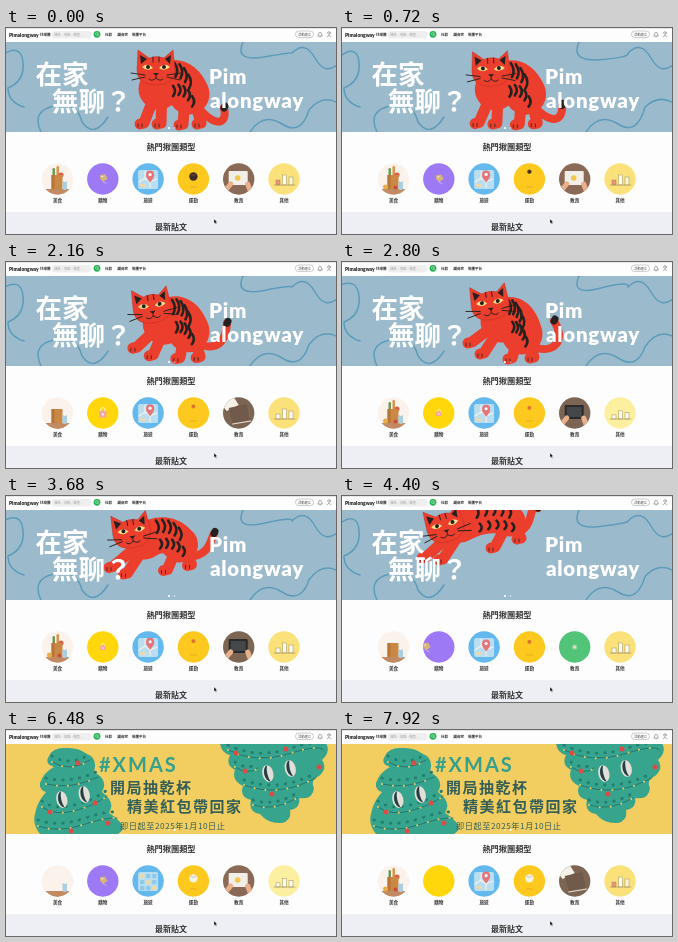
An HTML page that plays this animation: 330 by 206 pixels, repeating every 8 s.

```html
<!DOCTYPE html>
<html lang="zh-Hant">
<head>
<meta charset="utf-8">
<style>
html, body { margin: 0; width: 100%; height: 100%; overflow: hidden; background: #fdfdfd; }
svg { display: block; width: 100%; height: 100%; }
text { font-family: "Noto Sans CJK TC", "Noto Sans CJK", "Noto Sans CJK JP", sans-serif; }
.b { font-weight: 700; }
.l { fill: none; stroke-linecap: round; stroke-linejoin: round; }
.latin { font-family: Lato, sans-serif; font-weight: 900; }
.wire { stroke: #1f6a68; stroke-width: .8; }
.bulbs { stroke: #f2cf62; stroke-width: 2; stroke-dasharray: 0 11; }
.needles { stroke: #23806f; stroke-width: 3; stroke-dasharray: .4 8; stroke-linecap: butt; }
</style>
</head>
<body>
<svg viewBox="0 0 330 206" preserveAspectRatio="none">
  <defs>
    <clipPath id="hero"><rect y="14" width="330" height="90"/></clipPath>
    <clipPath id="disc"><circle r="15.7"/></clipPath>
    <g id="eye">
      <ellipse rx="5.5" ry="8.5" fill="#e2dfd6"/>
      <path d="M1-8.400A5.500 8.500 0 0 0 1 8.400Q-2 0 1-8.400" fill="#263f47"/>
    </g>
    <g id="face"><use href="#eye" x="-11.500"/><use href="#eye" x="11.500"/></g>
    <path id="wireL" class="l" d="M46 32Q64 43 84 30M40 54Q66 60 92 47M36 77Q48 86 68 81T101 66M32 96Q52 103 76 95T111 88"/>
    <path id="wireR" class="l" d="M222 20Q250 34 282 24T317 20M229 37Q242 46 252 38M238 55Q272 68 310 48M247 75Q268 82 291 68"/>
  </defs>

  <rect width="330" height="206" fill="#fdfdfd"/>
  <g clip-path="url(#hero)">
    <g id="catSlide">
      <rect y="14" width="330" height="90" fill="#9bbbcc"/>
      <path id="waves" class="l" stroke="#5c9cba" stroke-width="1.5"/>
      <g id="cat"></g>
      <g fill="#fff">
        <text class="b" x="29.5" y="56" font-size="26.5">在家</text>
        <text class="b" x="46" y="83" font-size="26.5">無聊？</text>
        <g font-size="20.5" letter-spacing=".7">
          <text class="latin" x="203" y="56">Pim</text>
          <text class="latin" x="204" y="80">alongway</text>
        </g>
      </g>
    </g>
    <g id="treeSlide">
      <rect y="14" width="330" height="90" fill="#f2cd60"/>
      <g fill="#37a48d">
        <path d="M60 18Q47 17 43 26Q38 34 48 37Q38 42 34 53Q33 60 40 62Q31 72 29 84Q26 95 35 105H110Q121 100 114 92Q110 87 103 83Q110 72 96 62Q103 50 88 42Q92 28 81 24Q72 17 60 18Z"/>
        <path d="M214 13Q215 23 224 25Q219 35 229 40Q225 50 237 56Q233 67 245 70Q242 82 254 84Q262 94 276 93Q286 90 284 80Q295 78 293 68Q307 70 308 58Q304 50 313 46Q322 38 316 30Q325 22 320 13Z"/>
      </g>
      <use href="#wireL" class="needles" y="-6"/><use href="#wireR" class="needles" y="-5"/>
      <use href="#wireL" class="wire"/><use href="#wireR" class="wire"/>
      <use href="#wireL" class="bulbs"/><use href="#wireR" class="bulbs"/>
      <path class="l" d="M65 101h0M89 73h0M44 82h0M72 33h0M102 93h0M239 41h0M266 64h0M313 37h0M280 19h0M230 23h0" stroke="#d94c48" stroke-width="5"/>
      <use href="#face" transform="translate(67 67) rotate(-13)"/>
      <use href="#face" transform="translate(273 41) rotate(-13)"/>
      <text class="latin" x="93" y="41.500" font-size="20" letter-spacing="2" fill="#35a08c" style="font-weight:700">#XMAS</text>
      <g fill="#345f57" class="b">
        <text x="104" y="62.500" font-size="15" letter-spacing="1.500">開局抽乾杯</text>
        <text x="121" y="82" font-size="15" letter-spacing="1.500">精美紅包帶回家</text>
        <text x="114" y="98.700" font-size="8.200" letter-spacing=".55" style="font-weight:500">即日起至2025年1月10日止</text>
      </g>
    </g>
    <circle id="dotA" cx="163" cy="100" r="1.1" fill="#fff"/>
    <circle id="dotB" cx="168.500" cy="100" r="1.1" fill="#fff"/>
  </g>

  <path d="M0 .3H330" stroke="#c9c9c9" stroke-width=".6"/>
  <text class="latin" x="3" y="8.800" font-size="4.900" fill="#222">Pimalongway</text>
  <g font-size="3.500" fill="#333" class="b">
    <text x="34" y="7.700">找揪團</text><text x="99" y="7.700">社群</text>
    <text x="111.500" y="7.700">購商家</text><text x="126" y="7.700">揪團平台</text>
  </g>
  <rect x="46" y="3" width="39" height="7.500" rx="2" fill="#efefef"/>
  <text x="48.500" y="7.700" font-size="3.200" fill="#999">團名、地點、類型...</text>
  <circle cx="91" cy="6.300" r="3.400" fill="#25b254"/>
  <path class="l" d="M92 7.300l1 1M92.300 6a1.400 1.400 0 1 1-2.800 0a1.400 1.400 0 1 1 2.800 0" stroke="#fff" stroke-width=".4"/>
  <rect x="289.500" y="3" width="18" height="6.600" rx="3.300" fill="#fff" stroke="#999" stroke-width=".5"/>
  <text x="298.500" y="7.600" font-size="3.300" text-anchor="middle" fill="#444">活動建立</text>
  <g class="l" stroke="#777" stroke-width=".6">
    <path d="M312 7.800Q312.700 7 312.700 5.800A1.400 1.400 0 0 1 315.500 5.800Q315.500 7 316.200 7.800ZM313.700 8.900h.8"/>
    <circle cx="323" cy="5" r="1.300"/><path d="M321 8.800Q323 5.800 325 8.800"/>
  </g>

  <text class="b" x="165" y="121.700" font-size="8.200" text-anchor="middle" fill="#333">熱門揪團類型</text>
  <g id="icons"></g>
  <rect y="184" width="330" height="22" fill="#eeeff4"/>
  <text class="b" x="165" y="201.700" font-size="8" text-anchor="middle" fill="#333">最新貼文</text>
  <path d="M208 191v4.600l1.100-1 .8 1.700.8-.4-.8-1.600h1.400z" fill="#111" stroke="#fff" stroke-width=".3"/>
</svg>
<script>
const $ = id => document.getElementById(id);
const clamp = v => Math.max(0, Math.min(1, v));
const ease = v => (v = clamp(v)) * v * (3 - 2 * v);
const mix = (a, b, k) => a.map((v, i) => v + (b[i] - v) * k);

// head x, y, tilt | spine curve | body width | four feet | tail curve
const poses = [
  [150, 40, 0, 153, 61, 172, 42, 183, 66, 41, 138, 95, 155, 95, 177, 96, 195, 95, 208, 99, 222, 98, 218, 80],
  [143, 48, -12, 156, 64, 174, 44, 186, 66, 43, 132, 92, 154, 95, 179, 95, 197, 94, 220, 90, 215, 66, 226, 61],
  [148, 41, -7, 159, 60, 173, 47, 180, 72, 41, 130, 80, 142, 91, 170, 96, 192, 95, 214, 94, 224, 77, 214, 60],
  [103, 29, -14, 119, 31, 146, 16, 168, 25, 31, 84, 61, 101, 63, 153, 51, 179, 42, 194, 28, 185, 9, 198, 13]
];
// time, pose
const marks = [[0, 0], [520, 0], [1320, 1], [1680, 1], [2560, 2], [3040, 2], [4320, 3], [5100, 3]];

function poseAt(t) {
  const i = marks.findIndex(m => m[0] > t);
  const [a, p] = marks[i - 1], [b, q] = marks[i];
  return mix(poses[p], poses[q], ease((t - a) / (b - a)));
}

const limb = (d, w, c = '#eb3e2c') => `<path class="l" d="${d}" stroke="${c}" stroke-width="${w}"/>`;

function drawCat(t) {
  const p = poseAt(t), sway = Math.sin(t / 260);
  const [hx, hy, tilt, x0, y0, cx, cy, x1, y1, w] = p;
  const tail = p.slice(18);
  tail[4] += 2 * sway; tail[5] += sway;
  let s = limb(`M${x1 + 8} ${y1 + 12}C${tail}`, 8) + limb(`M${tail[4]} ${tail[5]}l1-2`, 7, '#26211f');
  for (let i = 0; i < 4; i++) {
    const fx = p[10 + 2 * i], fy = p[11 + 2 * i], [bx, by] = i < 2 ? [x0 - 2 + 5 * i, y0] : [x1 - 22 + 9 * i, y1 + 5];
    s += limb(`M${bx} ${by}L${fx} ${fy}l-4 1`, 11);
    s += limb(`M${fx - 6} ${fy + 1}v3M${fx - 2} ${fy + 1}v3`, .8, '#26211f');
  }
  s += limb(`M${x0} ${y0}Q${cx} ${cy} ${x1} ${y1}`, w);
  for (let i = 0; i < 5; i++) {
    const k = .28 + i * .17, j = 1 - k;
    const x = j * j * x0 + 2 * j * k * cx + k * k * x1, y = j * j * y0 + 2 * j * k * cy + k * k * y1;
    s += limb(`M${x} ${y - w * .43}q5 ${w * .17} 1 ${w * .34}M${x + 4} ${y + w * .1}q4 ${w * .13} 0 ${w * .25}`, 2.6, '#26211f');
  }
  return s + `<g transform="translate(${hx} ${hy}) rotate(${tilt + sway})">
    <path d="M-18-18L-7-10Q1-13 8-10L17-18L19 2Q18 17 0 17Q-19 17-19 2Z" fill="#eb3e2c" stroke="#c32d25" stroke-width=".5"/>
    <path d="M-16-13l1 9 6-5zM15-13l-1 9-5-5z" fill="#26211f"/>
    <path d="M-14-1Q-8-6-3 0Q-9 4-14-1M3 0Q8-6 14-1Q8 4 3 0" fill="#f8dd8c"/>
    <circle cx="-8" cy="-1" r="2" fill="#222"/><circle cx="8" cy="-1" r="2" fill="#222"/>
    <path d="M-3 5h6l-3 3z" fill="#26211f"/>
    ${limb('M0 8v2q-4 4-7 1M0 10q4 4 7 1M-11 7l-14-2M-11 9l-13 3M11 7l14-2M11 9l13 3M-3-11v5M3-11v5', .9, '#26211f')}</g>`;
}

const box = (x, y, w, h, c, r = .6) => `<rect x="${x}" y="${y}" width="${w}" height="${h}" rx="${r}" fill="${c}"/>`;
const dot = (x, y, r, c) => `<circle cx="${x}" cy="${y}" r="${r}" fill="${c}"/>`;
const bg = c => dot(0, 0, 17, c);
const at = (x, y, k, s) => `<g transform="translate(${x} ${y}) scale(${k})">${s}</g>`;
const cycle = (t, start, len) => ((t - start) % len + len) % len;

function food(t) {
  const u = cycle(t, 1500, 2350);
  const rise = (start, s) => at(0, 24 * (1 - ease((u - start) / 200)), 1, s);
  return bg('#fbf2ec') +
    rise(600, box(-5, -11, 2.5, 12, '#6a9a55', 1.2) + box(-1, -13, 2.5, 14, '#d9924a', 1.2) + dot(3.5, -4, 2.5, '#d95d42')) +
    rise(330, box(-6, -4, 11, 14, '#cb8744') + box(-6, -4, 3, 14, '#b87538')) +
    rise(60, box(-14, 10, 28, 6, '#c28a62')) +
    rise(80, box(5, 2, 4.5, 9, '#a9cfdf', 1.4) + box(6.2, -2, 2.1, 5, '#f4f4f2')) +
    rise(780, dot(-8, 8, 2.5, '#e6ad49') + dot(2, 8.5, 2, '#c54e3c'));
}

function shop(t) {
  if (t < 800 || t >= 4000 && t < 7400) {
    const x = t < 4000 ? 1 : -14 + 15 * ease((t - 4250) / 650);
    return bg('#9d79f5') + at(x, -1 + Math.sin(t / 300) / 2, .75,
      '<path d="M-5-4L2-5 5 1-1 5-5 1Z" fill="#d9b27c"/>' + dot(-2, -2, 1, '#fff') + limb('M-1 5l4 2', 1.2, '#cbb9f5'));
  }
  const k = t > 7400 ? 0 : ease((t - 950) / 450) * (1 - .35 * ease((t - 2000) / 500));
  return bg('#ffd70b') + at(0, 0, .8 * k, box(-5, -3, 10, 9, '#f5a3a4') + limb('M-3-3v-2q3-5 6 0v2', 1.2, '#fff') + dot(0, 2, 1.5, '#fff'));
}

function travel(t) {
  const route = t > 1050 && t < 2150, grid = t > 5900 && t < 7100;
  if (route) return bg('#63b9ee') + box(-10, -9, 20, 19, '#9eb9b5') + limb('M-9 5l6-4 6 1 7-8', 1.5, '#e2e6dc');
  let s = bg('#63b9ee') + box(-10, -9, 20, 19, '#b9deef', 2);
  if (grid) {
    for (let i = 0; i < 9; i++) s += box(-8 + i % 3 * 6, -7 + (i / 3 | 0) * 6, 4.3, 4.3, i % 4 ? '#8ec9ea' : '#ecd9a8');
    return s;
  }
  return s + limb('M-9 3l6-4 5 4 7-3M-3-8v8M2 3v6', 1.1, '#f3f2ea') + box(-8, 5, 6, 3, '#e8d8b4') +
    at(2, -2 + Math.sin(t / 220), .8, '<path d="M0 7Q-6 0-5-3A5 5 0 0 1 5-3Q6 0 0 7Z" fill="#e5747a"/>' + dot(0, -3, 2, '#fff'));
}

function sport(t) {
  const r = 2 + 2.2 * (1 - ease((t - 300) / 500) + ease((t - 4500) / 500));
  const y = -5 + 2.5 * Math.cos(t / 255), white = t > 5800;
  const color = t < 800 ? '#3a3028' : white ? '#f6f2e4' : '#e27a32';
  return bg('#fdc91f') + limb('M-3 8h6', .8, '#dfa91a') + dot(0, y, r, color) +
    limb(`M${-r * .6} ${y - r * .5}q${r * .6} ${r * .6} ${r * 1.2} 0`, .5, white ? '#8d8a80' : '#b9582a');
}

function study(t) {
  if (t > 3950 && t < 5700) {
    return bg('#51c477') + dot(0, 0, 3 + .5 * Math.sin(t / 240), '#7fd49a') + dot(0, 0, 1.5, '#f1d7c4');
  }
  const open = t < 800 || t > 5700 && t < 7000, dark = t > 2200 && t < 4000;
  const s = bg(open ? '#8a6a57' : '#7d6554');
  if (open || dark) {
    return s + box(-10, -8, 19, 14, dark ? '#292a2d' : '#f2eee8', 1) +
      (dark ? box(-8, -6, 15, 10, '#45484b') : dot(-1, -1, 2.8, '#f2c74c')) +
      limb('M-13 11l5-6M12 13l-3-8', 5, '#e9b08c');
  }
  return s + '<path d="M-17-8L-5-16 0-8-12-2Z" fill="#f5f1e9"/><path d="M-10-5L8-9 11 7-6 10Z" fill="#715a4a"/>' +
    limb('M-6 11L12 8', 1.2, '#e9e0d4');
}

function other(t) {
  const u = cycle(t, 850, 1800), pink = t < 850 || t > 4750 && t < 5900 || t > 7300;
  const pale = t > 2200 && t < 3500 || t > 6000 && t < 7100;
  const h = 8 + 2 * ease(u / 900), c = pink ? '#f0907f' : '#fffdf1';
  const bar = (x, n, color) => `<rect x="${x}" y="${6 - n}" width="4" height="${n}" fill="${color}" stroke="#a08c55" stroke-width=".5"/>`;
  return bg(pale ? '#fcef9f' : '#fbe17a') + bar(-8, h * .5, c) + bar(-1.5, h, '#fffdf1') +
    bar(5, h * .8, pink ? '#fff6d7' : c) + limb('M-10 6h21', .6, '#a08c55');
}

const kinds = [['美食', food], ['購物', shop], ['旅遊', travel], ['運動', sport], ['教育', study], ['其他', other]];

function draw(t) {
  const slide = ease((t - 4560) / 480);
  $('catSlide').setAttribute('transform', `translate(${-330 * slide})`);
  $('treeSlide').setAttribute('transform', `translate(${330 * (1 - slide)})`);
  $('dotA').setAttribute('opacity', 1 - .6 * slide);
  $('dotB').setAttribute('opacity', .4 + .6 * slide);
  if (slide < 1) {
    const d = 3 * Math.sin(t / 650);
    $('waves').setAttribute('d', `M-4 ${27 + d}Q15 15 17 34T2 60Q2 74 18 79M35 104Q25 83 48 78T76 94Q88 111 102 89
      M237 14Q228 34 258 ${29 + d}T286 25Q299 12 309 30T332 36M244 104Q257 84 276 96T303 ${82 - d}Q316 66 332 75`);
    $('cat').innerHTML = drawCat(t);
  }
  $('icons').innerHTML = kinds.map(([name, icon], i) => {
    const x = 51.5 + 45.3 * i;
    return `<g transform="translate(${x} 151)" clip-path="url(#disc)">${icon(t)}</g>
      <text class="b" x="${x}" y="173.600" font-size="4.600" text-anchor="middle" fill="#333">${name}</text>`;
  }).join('');
}

const start = performance.now();
function frame(now) {
  draw(Math.floor(Math.max(0, now - start) % 8000 / 80) * 80);
  requestAnimationFrame(frame);
}
draw(0);
requestAnimationFrame(frame);
</script>
</body>
</html>
```
